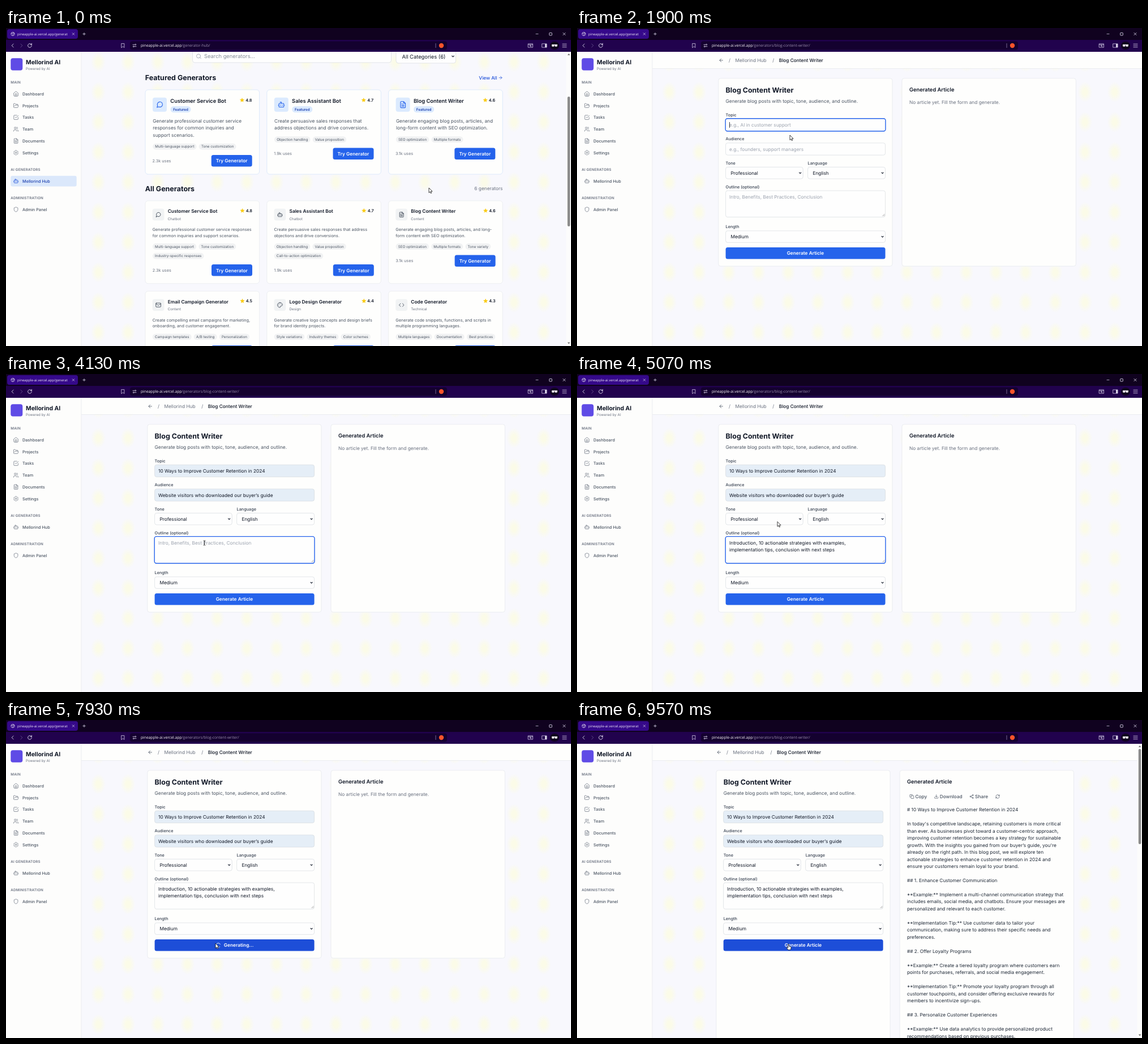
Animation, 998 px wide and 561 px high, one loop 9600 ms. Source, as an HTML page with a canvas:

```html
<!DOCTYPE html>
<html lang="en">
<head>
<meta charset="utf-8">
<title>Blog Content Writer</title>
<style>
html, body { margin: 0; width: 100%; height: 100%; overflow: hidden; background: #f8f8fd; }
canvas { display: block; width: 998px; height: 561px; }
</style>
</head>
<body>
<canvas id="stage"></canvas>
<script>
const W = 998, H = 561, LOOP = 9600;
const canvas = document.getElementById('stage');
const ratio = window.devicePixelRatio || 1;
canvas.width = W * ratio;
canvas.height = H * ratio;
const ctx = canvas.getContext('2d');

const BRAND = 'Mellorind';
const INK = '#111827', BODY = '#4b5563', MUTED = '#6b7280', BLUE = '#2563eb', DEEP = '#1d4ed8';
const BIG = 12.48, MID = 9.36, BASE = 8.32, SMALL = 7.28, TINY = 6.24;

// Moments at which the page changes
const AT = {
  open: 800, topic: 1600, topicFill: 2300, audience: 2650, audienceFill: 3000,
  outline: 3600, outlineFill: 4400, tone: 5300, hover: 6480, generate: 6800, done: 8600
};

const ICONS = {
  home: 'M3 9l9-7 9 7v11a2 2 0 0 1-2 2H5a2 2 0 0 1-2-2z M9 22V12h6v10',
  folder: 'M6 14l1.5-2.9A2 2 0 0 1 9.24 10H20a2 2 0 0 1 1.94 2.5l-1.54 6a2 2 0 0 1-1.95 1.5H4a2 2 0 0 1-2-2V5a2 2 0 0 1 2-2h3.9a2 2 0 0 1 1.7.9l.8 1.2a2 2 0 0 0 1.67.9H18a2 2 0 0 1 2 2v2',
  check: 'M9 11l3 3L22 4 M21 12v7a2 2 0 0 1-2 2H5a2 2 0 0 1-2-2V5a2 2 0 0 1 2-2h11',
  users: 'M16 21v-2a4 4 0 0 0-4-4H6a4 4 0 0 0-4 4v2 M13 7a4 4 0 1 1-8 0a4 4 0 1 1 8 0 M22 21v-2a4 4 0 0 0-3-3.87 M16 3.13a4 4 0 0 1 0 7.75',
  file: 'M14.5 2H6a2 2 0 0 0-2 2v16a2 2 0 0 0 2 2h12a2 2 0 0 0 2-2V7.5z M14 2v6h6 M16 13H8 M16 17H8 M10 9H8',
  bot: 'M12 8V4H8 M6 8h12a2 2 0 0 1 2 2v8a2 2 0 0 1-2 2H6a2 2 0 0 1-2-2v-8a2 2 0 0 1 2-2z M2 14h2 M20 14h2 M15 13v2 M9 13v2',
  shield: 'M20 13c0 5-3.5 7.5-8 9c-4.5-1.5-8-4-8-9V6a1 1 0 0 1 1-1c2 0 4.5-1.2 7-3c2.5 1.8 5 3 7 3a1 1 0 0 1 1 1z',
  chat: 'M3 21l1.9-5.7a8.5 8.5 0 1 1 3.8 3.8z',
  mail: 'M4 4h16a2 2 0 0 1 2 2v12a2 2 0 0 1-2 2H4a2 2 0 0 1-2-2V6a2 2 0 0 1 2-2z M22 7l-10 6L2 7',
  palette: 'M12 2a10 10 0 0 0 0 20c1.5 0 2-1.6 1.2-2.8c-1-1.3 0-2.8 1.3-2.8h2c3 0 5.5-2.5 5.5-5.5C22 6 17.5 2 12 2z M13.5 6.5h.1 M17.5 10.5h.1 M8.5 7.5h.1 M6.5 12.5h.1',
  code: 'M16 18l6-6-6-6 M8 6l-6 6 6 6',
  copy: 'M10 8h10a2 2 0 0 1 2 2v10a2 2 0 0 1-2 2H10a2 2 0 0 1-2-2V10a2 2 0 0 1 2-2z M4 16a2 2 0 0 1-2-2V4a2 2 0 0 1 2-2h10a2 2 0 0 1 2 2',
  download: 'M21 15v4a2 2 0 0 1-2 2H5a2 2 0 0 1-2-2v-4 M7 10l5 5 5-5 M12 15V3',
  share: 'M21 5a3 3 0 1 1-6 0a3 3 0 1 1 6 0 M9 12a3 3 0 1 1-6 0a3 3 0 1 1 6 0 M21 19a3 3 0 1 1-6 0a3 3 0 1 1 6 0 M8.6 13.5l6.8 4 M15.4 6.5l-6.8 4',
  refresh: 'M3 12a9 9 0 0 1 16-6L21 8 M21 3v5h-5 M21 12a9 9 0 0 1-16 6L3 16 M8 16H3v5',
  left: 'M12 19l-7-7 7-7 M19 12H5',
  right: 'M5 12h14 M12 5l7 7-7 7',
  down: 'M6 9l6 6 6-6',
  back: 'M15 4l-8 8 8 8',
  next: 'M9 4l8 8-8 8',
  loader: 'M21 12a9 9 0 1 1-6.22-8.56',
  search: 'M19 11a8 8 0 1 1-16 0a8 8 0 1 1 16 0 M21 21l-4.3-4.3',
  reload: 'M20 12a8 8 0 1 1-2.5-5.8L20 8 M20 3v5h-5',
  bookmark: 'M6 3h12v18l-6-5-6 5z',
  tune: 'M3 7h9 M20 7a3 3 0 1 1-6 0a3 3 0 1 1 6 0 M21 17h-9 M10 17a3 3 0 1 1-6 0a3 3 0 1 1 6 0',
  globe: 'M22 12a10 10 0 1 1-20 0a10 10 0 1 1 20 0 M3 9h8l3 5-3 7 M21 8h-6V3',
  panel: 'M2 4h20v16H2z',
  tabs: 'M2 4h20v16H2z M2 8h20 M14 13a2.5 2.5 0 1 1-5 0a2.5 2.5 0 1 1 5 0 M14 15l2 2',
  close: 'M5 5l14 14 M19 5L5 19',
  plus: 'M12 4v16 M4 12h16',
  minus: 'M4 12h16',
  menu: 'M3 5h18 M3 12h18 M3 19h18'
};
const shapes = {};
for (const key in ICONS) shapes[key] = new Path2D(ICONS[key]);
shapes.gear = new Path2D();
for (let i = 0; i < 72; i++) {
  const a = i * Math.PI / 36, r = 8.8 + 1.3 * Math.cos(6 * a);
  shapes.gear.lineTo(12 + r * Math.sin(a), 12 - r * Math.cos(a));
}
shapes.gear.closePath();
shapes.gear.moveTo(15, 12);
shapes.gear.arc(12, 12, 3, 0, 7);

function icon(name, cx, cy, size, color, weight = 2, turn = 0) {
  ctx.save();
  ctx.translate(cx, cy);
  ctx.rotate(turn);
  ctx.scale(size / 24, size / 24);
  ctx.translate(-12, -12);
  ctx.lineWidth = weight;
  ctx.lineCap = ctx.lineJoin = 'round';
  ctx.strokeStyle = color;
  ctx.stroke(shapes[name]);
  ctx.restore();
}

// cy is the middle of the capitals
function text(str, x, cy, size, color = BODY, weight = 400, align = 'left', family = 'Inter') {
  ctx.font = `${weight} ${size}px ${family}, sans-serif`;
  ctx.fillStyle = color;
  ctx.textAlign = align;
  ctx.fillText(str, x, cy + size * 0.36);
}

function box(x, y, w, h, r, fill, line, lineWidth = 0.6) {
  ctx.beginPath();
  ctx.roundRect(x, y, w, h, r);
  if (fill) { ctx.fillStyle = fill; ctx.fill(); }
  if (line) { ctx.strokeStyle = line; ctx.lineWidth = lineWidth; ctx.stroke(); }
}

function dot(x, y, r, color) {
  ctx.beginPath();
  ctx.arc(x, y, r, 0, 7);
  ctx.fillStyle = color;
  ctx.fill();
}

function star(x, y) {
  ctx.beginPath();
  for (let i = 0; i < 10; i++) {
    const a = i * Math.PI / 5, r = i % 2 ? 2 : 4.4;
    ctx.lineTo(x + r * Math.sin(a), y - r * Math.cos(a));
  }
  ctx.closePath();
  ctx.fillStyle = '#facc15';
  ctx.fill();
}

function background() {
  ctx.fillStyle = '#f8f8fd';
  ctx.fillRect(0, 42, W, H);
  for (let x = 163; x < W; x += 52.45) {
    for (let y = 60; y < H; y += 53) {
      ctx.save();
      ctx.translate(x, y);
      ctx.scale(13, 18);
      const glow = ctx.createRadialGradient(0, 0, 0.3, 0, 0, 1);
      glow.addColorStop(0, '#fbfbe8');
      glow.addColorStop(1, 'rgba(251,251,232,0)');
      ctx.fillStyle = glow;
      ctx.fillRect(-1, -1, 2, 2);
      ctx.restore();
    }
  }
}

function browser(path) {
  const ui = '#d6cfe6', web = 'Open Sans';
  ctx.fillStyle = '#10021f';
  ctx.fillRect(0, 0, W, 21);
  ctx.fillStyle = '#21024d';
  ctx.fillRect(0, 21, W, 21);
  box(2, 2, 125, 17, 4, '#35098a');
  icon('globe', 12, 10.5, 7.5, ui, 2.5);
  ctx.save();
  ctx.beginPath();
  ctx.rect(18, 2, 91, 17);
  ctx.clip();
  text('pineapple-ai.vercel.app/generators', 20, 10.5, 6, '#eeeaf6', 400, 'left', web);
  ctx.restore();
  icon('close', 119, 10.5, 6, ui, 3);
  icon('plus', 138, 10.5, 6.5, ui, 3);
  icon('minus', 938, 10.5, 6, ui, 3);
  box(959.7, 8.4, 4.6, 4.6, 0.6, null, ui, 0.9);
  icon('close', 986, 10.5, 7, ui, 3);
  icon('back', 12, 31, 9, ui, 2.4);
  icon('next', 27, 31, 9, '#65518c', 2.4);
  icon('reload', 42, 31, 10, ui, 2.4);
  icon('bookmark', 206.5, 31, 9.5, ui, 2);
  box(219, 23.5, 560, 15, 4, '#14012f');
  icon('tune', 227, 31, 8, ui, 2.6);
  const host = 'pineapple-ai.vercel.app';
  text(host, 238, 31, 6.7, '#ffffff', 400, 'left', web);
  text(path, 238 + ctx.measureText(host).width, 31, 6.7, '#9b90ae', 400, 'left', web);
  ctx.fillStyle = '#8d80a8';
  ctx.fillRect(758.6, 27, 0.8, 8);
  dot(769, 31, 4.2, '#fb542b');
  icon('tabs', 926.5, 31, 9.5, ui, 2);
  icon('panel', 951, 31, 9.5, ui, 2);
  ctx.fillStyle = ui;
  ctx.fillRect(952, 28, 3.2, 6);
  box(961, 24, 16, 14, 7, '#10021f');
  box(964, 29.3, 4.5, 3.4, 1.5, '#fff');
  box(969.3, 29.3, 4.5, 3.4, 1.5, '#fff');
  ctx.fillRect(964, 29, 10, 1);
  icon('menu', 986.5, 31, 9.5, ui, 2);
}

function sidebar(onHub) {
  ctx.fillStyle = '#fdfdfc';
  ctx.fillRect(0, 42, 133, H);
  ctx.fillStyle = '#e5e7eb';
  ctx.fillRect(132.6, 42, 0.7, H);
  box(8.3, 53.3, 21, 21.4, 4, '#5f4be6');
  text(BRAND + ' AI', 35, 60, 10.4, INK, 700);
  text('Powered by AI', 35, 71.3, TINY, MUTED);
  ctx.letterSpacing = '0.22px';
  [['MAIN', 96], ['AI GENERATORS', 250], ['ADMINISTRATION', 300]]
    .forEach(([s, y]) => text(s, 8.3, y, TINY, MUTED, 600));
  ctx.letterSpacing = '0px';
  if (onHub) box(8.3, 260.7, 116.4, 18.8, 3, '#dbe8fb');
  [['Dashboard', 'home', 116], ['Projects', 'folder', 137], ['Tasks', 'check', 157.7],
   ['Team', 'users', 178.5], ['Documents', 'file', 199.3], ['Settings', 'gear', 220],
   [BRAND + ' Hub', 'bot', 270], ['Admin Panel', 'shield', 320]]
    .forEach(([s, name, y]) => {
      const active = onHub && name === 'bot';
      icon(name, 17.6, y, 10, active ? DEEP : MUTED, 1.8);
      text(s, 29, y, SMALL, active ? '#1e40af' : BODY, 500);
    });
}

function scrollbar(top, bottom) {
  ctx.fillStyle = '#fcfcfc';
  ctx.fillRect(989.5, 42, 9, H);
  box(991.8, top, 4.6, bottom - top, 2.3, '#8b8b8b');
  ctx.fillStyle = '#777';
  [[47, -1], [555.5, 1]].forEach(([y, d]) => {
    ctx.beginPath();
    ctx.moveTo(991.8, y - d);
    ctx.lineTo(996.4, y - d);
    ctx.lineTo(994.1, y + 2 * d);
    ctx.fill();
  });
}

function tags(list, x, cy) {
  for (const tag of list) {
    ctx.font = `400 ${TINY}px Inter, sans-serif`;
    const w = ctx.measureText(tag).width + 8.3;
    box(x, cy - 5.4, w, 10.8, 5.4, '#f1f2f3');
    text(tag, x + 4.15, cy, TINY, BODY);
    x += w + 4.15;
  }
}

function tryRow(x, cy, uses) {
  text(uses + ' uses', x + 12.7, cy, SMALL, MUTED);
  box(x + 117, cy - 10.3, 72, 20.6, 3.5, BLUE);
  text('Try Generator', x + 153, cy + 0.3, BASE, '#fff', 600, 'center');
}

const featured = [
  ['Customer Service Bot', 'chat', '4.8', '2.3k', ['Generate professional customer service', 'responses for common inquiries and', 'support scenarios.'], ['Multi-language support', 'Tone customization']],
  ['Sales Assistant Bot', 'bot', '4.7', '1.9k', ['Create persuasive sales responses that', 'address objections and drive conversions.'], ['Objection handling', 'Value proposition']],
  ['Blog Content Writer', 'file', '4.6', '3.1k', ['Generate engaging blog posts, articles, and', 'long-form content with SEO optimization.'], ['SEO optimization', 'Multiple formats']]
];
const all = [
  ['Customer Service Bot', 'Chatbot', 'chat', '4.8', '2.3k', ['Generate professional customer service responses', 'for common inquiries and support scenarios.'], ['Multi-language support', 'Tone customization'], ['Industry-specific responses']],
  ['Sales Assistant Bot', 'Chatbot', 'bot', '4.7', '1.9k', ['Create persuasive sales responses that address', 'objections and drive conversions.'], ['Objection handling', 'Value proposition'], ['Call-to-action optimization']],
  ['Blog Content Writer', 'Content', 'file', '4.6', '3.1k', ['Generate engaging blog posts, articles, and long-', 'form content with SEO optimization.'], ['SEO optimization', 'Multiple formats', 'Tone variety']],
  ['Email Campaign Generator', 'Content', 'mail', '4.5', '1.5k', ['Create compelling email campaigns for marketing,', 'onboarding, and customer engagement.'], ['Campaign templates', 'A/B testing', 'Personalization']],
  ['Logo Design Generator', 'Design', 'palette', '4.4', '1.2k', ['Generate creative logo concepts and design briefs', 'for brand identity projects.'], ['Style variations', 'Industry themes', 'Color schemes']],
  ['Code Generator', 'Technical', 'code', '4.3', '2.8k', ['Generate code snippets, functions, and scripts in', 'multiple programming languages.'], ['Multiple languages', 'Documentation', 'Best practices']]
];

function hub() {
  box(329.5, 38, 351, 23, 4, '#fefefe', '#d1d5db');
  icon('search', 340.5, 50, 10.5, '#9ca3af');
  text('Search generators...', 350, 49.2, MID, '#868d99');
  box(689, 38, 105.5, 24, 4, '#fefefe', '#d1d5db');
  text('All Categories (6)', 699.5, 50.2, MID, INK);
  icon('down', 789.5, 50, 7, INK, 4);
  text('Featured Generators', 245.8, 87.5, BIG, INK, 700);
  text('View All', 835.3, 87.7, BASE, DEEP, 500);
  icon('right', 873.5, 87.7, 8.5, DEEP);

  featured.forEach(([name, ic, score, uses, lines, list], i) => {
    const x = 246 + i * 214.8, low = 159.7 + lines.length * 12.5;
    box(x, 109, 201.6, 149, 5, '#fefefd', '#c9def8');
    box(x + 13, 122.7, 25, 25, 4, '#dbeafe');
    icon(ic, x + 25.6, 135.2, 13, BLUE);
    text(name, x + 44.3, 129, MID, INK, 600);
    box(x + 44.5, 138, 36, 11, 5.5, '#dbeafe');
    text('Featured', x + 62.5, 143.6, TINY, '#1e40af', 600, 'center');
    star(x + 171, 127.3);
    text(score, x + 188.5, 127.3, SMALL, INK, 600, 'right');
    lines.forEach((s, n) => text(s, x + 13.3, 163.7 + n * 12.5, BASE, BODY));
    tags(list, x + 13.2, low + 12);
    tryRow(x - 0.3, low + 37, uses);
  });

  text('All Generators', 245.8, 283.3, BIG, INK, 700);
  text('6 generators', 877.5, 283.3, BASE, MUTED, 400, 'right');
  all.forEach(([name, kind, ic, score, uses, lines, list, more], i) => {
    const x = 246 + i % 3 * 214.8, y = 304.8 + Math.floor(i / 3) * 159.4;
    box(x, y, 201.6, 146, 5, '#fefefd', '#e3e6ea');
    box(x + 12.7, y + 14, 20.8, 20.8, 4, '#f1f3f4');
    icon(ic, x + 23.1, y + 24.5, 10.4, '#374151');
    text(name, x + 39.7, y + 18.6, BASE, INK, 600);
    text(kind, x + 39.7, y + 31.9, TINY, MUTED);
    star(x + 171.5, y + 17.5);
    text(score, x + 189, y + 17.5, SMALL, INK, 600, 'right');
    lines.forEach((s, n) => text(s, x + 12.7, y + 51 + n * 10.4, SMALL, BODY));
    tags(list, x + 12.9, y + 80.7);
    if (more) tags(more, x + 12.9, y + 97.4);
    tryRow(x, y + (more ? 122.5 : 106), uses);
  });
  scrollbar(121, 350);
}

const article = `# 10 Ways to Improve Customer Retention in 2024

In today's competitive landscape, retaining customers is more critical
than ever. As businesses pivot toward a customer-centric approach,
improving customer retention becomes a key strategy for sustainable
growth. With the insights you gained from our buyer’s guide, you're
already on the right path. In this blog post, we will explore ten
actionable strategies to enhance customer retention in 2024 and
ensure your customers remain loyal to your brand.

## 1. Enhance Customer Communication

**Example:** Implement a multi-channel communication strategy that
includes emails, social media, and chatbots. Ensure your messages are
personalized and relevant to each customer.

**Implementation Tip:** Use customer data to tailor your
communication, making sure to address their specific needs and
preferences.

## 2. Offer Loyalty Programs

**Example:** Create a tiered loyalty program where customers earn
points for purchases, referrals, and social media engagement.

**Implementation Tip:** Promote your loyalty program through all
customer touchpoints, and consider offering exclusive rewards for
members to incentivize sign-ups.

## 3. Personalize Customer Experiences

**Example:** Use data analytics to provide personalized product
recommendations based on previous purchases.`.split('\n');

function caret(t, since, x, cy) {
  if ((t - since) % 1000 >= 500) return;
  ctx.fillStyle = '#111';
  ctx.fillRect(x, cy - 5, 0.8, 10);
}

function frame(x, y, w, h, focused, fill = '#fefefe') {
  if (focused) box(x - 0.4, y - 0.4, w + 0.8, h + 0.8, 3.5, fill, BLUE, 1.4);
  else box(x, y, w, h, 3.5, fill, '#d1d5db');
}

function input(t, y, value, hint, focusAt, fillAt, blurAt) {
  const filled = t >= fillAt, focused = t >= focusAt && t < blurAt, cy = y + 10.8;
  frame(262.6, y, 282, 21.4, focused, filled ? '#e5eef7' : '#fefefe');
  text(filled ? value : hint, 269, cy, BASE, filled ? INK : '#9ca3af');
  if (focused) caret(t, filled ? fillAt : focusAt, filled ? 269.3 + ctx.measureText(value).width : 269, cy);
}

function select(x, y, w, value, focused) {
  frame(x, y, w, 20.6, focused);
  text(value, x + 8.8, y + 10.4, BASE, INK);
  icon('down', x + w - 5, y + 10.4, 6.5, INK, 4);
}

function outline(t) {
  const filled = t >= AT.outlineFill, focused = t >= AT.outline && t < AT.tone;
  const last = 'implementation tips, conclusion with next steps';
  frame(262.6, 287, 282, 46.6, focused);
  if (filled) {
    text('Introduction, 10 actionable strategies with examples,', 269, 298, BASE, INK);
    text(last, 269, 310.4, BASE, INK);
  } else text('Intro, Benefits, Best Practices, Conclusion', 269, 298, BASE, '#9ca3af');
  if (focused) caret(t, filled ? AT.outlineFill : AT.outline, filled ? 269.3 + ctx.measureText(last).width : 269, filled ? 310.4 : 298);
  ctx.beginPath();
  ctx.moveTo(539.5, 332); ctx.lineTo(543.5, 328);
  ctx.moveTo(541.7, 332); ctx.lineTo(543.5, 330.2);
  ctx.strokeStyle = '#777';
  ctx.lineWidth = 0.6;
  ctx.stroke();
}

function mix(k) {
  const from = [37, 99, 235], to = [29, 78, 216];
  return `rgb(${from.map((v, i) => Math.round(v + (to[i] - v) * k))})`;
}

function form(t) {
  const done = t >= AT.done, busy = t >= AT.generate && !done;
  ctx.fillStyle = '#fefefd';
  ctx.fillRect(133.3, 42, W, 29);
  ctx.fillStyle = '#e5e7eb';
  ctx.fillRect(133.3, 71, W, 0.7);
  ctx.save();
  if (done) ctx.translate(-3.9, 0);

  icon('left', 254.7, 57, 9.5, BODY);
  text('/', 268, 57, BASE, MUTED);
  text(BRAND + ' Hub', 279.5, 57, BASE, MUTED);
  text('/', 345.3, 57, BASE, MUTED);
  text('Blog Content Writer', 356.8, 57, BASE, INK, 500);

  const tall = done ? 500 : 331.4;
  box(249.8, 88.8, 307.2, tall, 4, '#fefefd', '#dfe2e8');
  box(574, 88.8, 307.4, tall, 4, '#fefefd', '#dfe2e8');
  text('Blog Content Writer', 262.6, 109.8, BIG, INK, 700);
  text('Generate blog posts with topic, tone, audience, and outline.', 262.6, 128.8, BASE, BODY);
  [['Topic', 262.6, 153], ['Audience', 262.6, 195.3], ['Tone', 262.6, 238.2], ['Language', 407.6, 238.2],
   ['Outline (optional)', 262.6, 280], ['Length', 262.6, 350.7]]
    .forEach(([s, x, y]) => text(s, x, y, SMALL, '#374151', 500));
  input(t, 160.2, '10 Ways to Improve Customer Retention in 2024', 'e.g., AI in customer support', AT.topic, AT.topicFill, AT.audience);
  input(t, 202.8, 'Website visitors who downloaded our buyer’s guide', 'e.g., founders, support managers', AT.audience, AT.audienceFill, AT.outline);
  select(262.6, 245.4, 136.6, 'Professional', t >= AT.tone && t < AT.generate);
  select(407.6, 245.4, 137, 'English');
  outline(t);
  select(262.6, 357.8, 282, 'Medium');

  box(262.6, 387, 282, 20.6, 3.5, mix(Math.min(1, Math.max(0, (t - AT.hover) / 150))));
  if (busy) {
    icon('loader', 375, 397.3, 10, '#fff', 2, (t - AT.generate) / 1000 * Math.PI * 2);
    text('Generating...', 384.8, 397.4, BASE, '#fff', 600);
  } else text('Generate Article', 403.4, 397.4, BASE, '#fff', 600, 'center');

  text('Generated Article', 586.9, 108.7, MID, INK, 600);
  if (done) {
    [['Copy', 'copy', 595.3], ['Download', 'download', 638.6], ['Share', 'share', 701]]
      .forEach(([s, name, x]) => {
        icon(name, x, 135, 8.3, BODY);
        text(s, x + 6, 135.2, BASE, BODY, 500);
      });
    icon('refresh', 746.9, 135, 8.3, BODY);
    article.forEach((s, i) => text(s, 586.9, 158.2 + i * 12.48, BASE, '#1f2937'));
  } else text('No article yet. Fill the form and generate.', 586.9, 131, BASE, MUTED);
  ctx.restore();
  if (done) scrollbar(51, 219);
}

// time, x, y of the pointer tip
const path = [
  [0, 747, 282], [150, 747, 282], [550, 831, 222], [850, 831, 222], [1450, 380, 172], [1650, 380, 172],
  [1900, 376, 189], [2100, 372, 199], [2350, 372, 199], [2600, 365, 213], [2800, 365, 213],
  [3000, 358, 240], [3050, 358, 240], [3370, 350.5, 298], [4500, 350.5, 298], [5070, 354, 260.5],
  [5250, 354, 258], [5800, 354, 258], [6480, 373.5, 391], [7000, 373.5, 391],
  [7930, 370, 394], [8700, 370, 394], [9570, 373.5, 395], [LOOP, 373.5, 395]
];

function pointerAt(t) {
  const i = Math.max(1, path.findIndex(p => p[0] > t));
  const [t0, x0, y0] = path[i - 1], [t1, x1, y1] = path[i];
  const k = (t - t0) / (t1 - t0), e = k * k * (3 - 2 * k);
  return [x0 + (x1 - x0) * e, y0 + (y1 - y0) * e];
}

function pointerKind(t, x, y) {
  const within = (a, b) => y > a && y < b;
  if (t < AT.open) return x > 793 && within(212, 232) ? 'hand' : 'arrow';
  if (x < 262 || x > 545) return 'arrow';
  if (within(387, 408)) return t >= AT.generate && t < AT.done ? 'arrow' : 'hand';
  return within(160, 182) || within(203, 224) || within(287, 334) ? 'beam' : 'arrow';
}

const arrowShape = new Path2D('M0 0V8.6L2 6.8L3.3 9.7L4.7 9.1L3.4 6.2H6.1Z');
const handShape = new Path2D('M-.8 .7Q0-.4 .8 .7V4L4 4.8Q4.8 5 4.7 6L4.2 9.2L3.5 10.6H-.7L-3 7Q-3.3 5.8-2 6L-.8 7Z');
const beamShape = new Path2D('M-1.8-4.2Q0-4.2 0-3.2Q0-4.2 1.8-4.2M0-3.4V3.4M-1.8 4.2Q0 4.2 0 3.2Q0 4.2 1.8 4.2');

function pointer(t) {
  const [x, y] = pointerAt(t), kind = pointerKind(t, x, y);
  ctx.save();
  ctx.translate(x, y);
  ctx.lineJoin = 'round';
  ctx.strokeStyle = '#111';
  ctx.lineWidth = 0.8;
  if (kind === 'beam') ctx.stroke(beamShape);
  else {
    const shape = kind === 'hand' ? handShape : arrowShape;
    ctx.fillStyle = '#fff';
    ctx.fill(shape);
    ctx.stroke(shape);
  }
  ctx.restore();
}

function draw(now) {
  const t = now % LOOP, onHub = t < AT.open;
  ctx.setTransform(ratio, 0, 0, ratio, 0, 0);
  ctx.textRendering = 'geometricPrecision';
  background();
  if (onHub) hub();
  else form(t);
  sidebar(onHub);
  browser(onHub ? '/generator-hub/' : '/generators/blog-content-writer/');
  pointer(t);
}

const start = performance.now();
function tick() {
  draw(performance.now() - start);
  requestAnimationFrame(tick);
}
tick();
</script>
</body>
</html>
```
